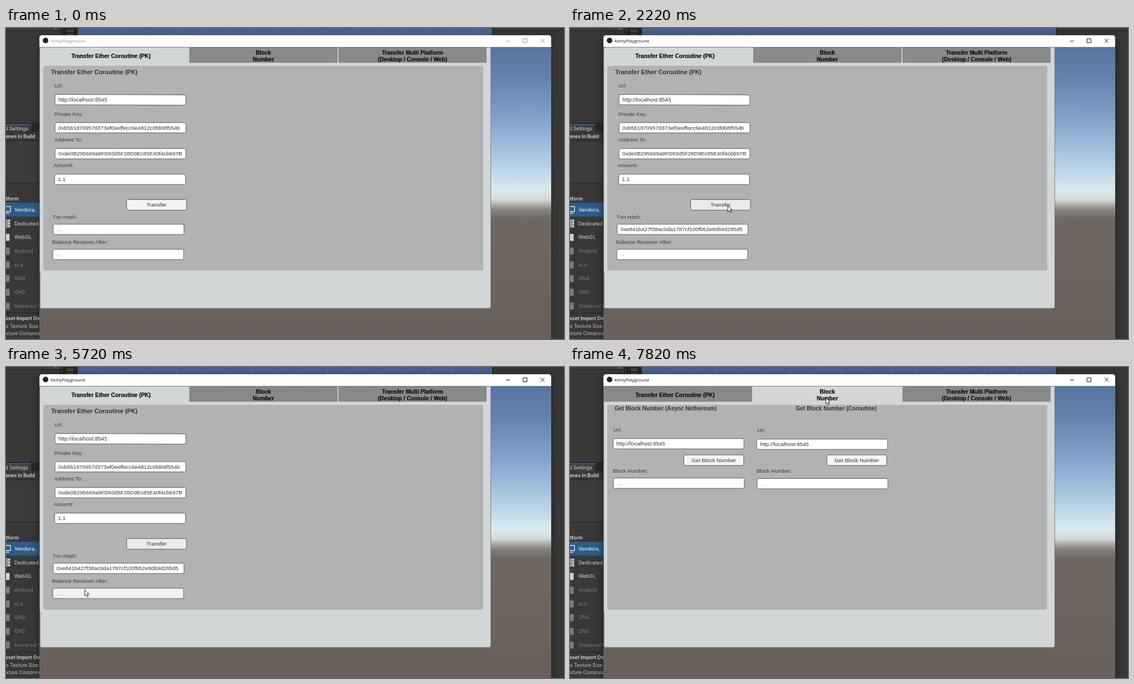
An HTML page for the animation above (8 s loop, 1002 by 559 pixels).

```html
<!DOCTYPE html>
<html lang="en">
<head>
<meta charset="utf-8">
<title>Transfer demo</title>
<style>
  html, body { margin: 0; width: 100%; height: 100%; overflow: hidden; background: #383838; }
  svg { display: block; width: 1002px; height: 559px; }
  text { white-space: pre; }
  .ui { font-family: "Liberation Sans", Arial, sans-serif; }
  .ed { font-family: Inter, Roboto, sans-serif; }
  .title { font-family: "Open Sans", "Noto Sans", sans-serif; }
</style>
</head>
<body>
<svg id="stage" viewBox="0 0 1002 559" xmlns="http://www.w3.org/2000/svg"></svg>
<script>
const LOOP = 8000, STEP = 69;
const CLICK = 2010, HASH = 2220, BALANCE = 6320, TAB_CLICK = 7750, SWITCH = 7820;

const rect = (x, y, w, h, fill, extra = '') =>
  `<rect x="${x}" y="${y}" width="${w}" height="${h}" fill="${fill}" ${extra}/>`;
const text = (x, y, size, str, fill, extra = '', cls = 'ui') =>
  `<text class="${cls}" x="${x}" y="${y}" font-size="${size}" fill="${fill}" ${extra}>${str}</text>`;
const line = (d, stroke, w = 1, extra = '') =>
  `<path d="${d}" fill="none" stroke="${stroke}" stroke-width="${w}" ${extra}/>`;
const bold = 'font-weight="700"', mid = 'text-anchor="middle"';

const label = (x, y, str) => text(x, y, 9.65, str, '#3c3c3c');
const box = (x, y, w, h, fill, id) =>
  rect(x, y, w, h, fill, `rx="2.5" stroke="#5c5c5c" ${id ? `id="${id}"` : ''}`);
const field = (x, y, str, id, color = '#323232') =>
  box(x, y, 235, 18.5, '#fff', id) +
  text(x + 6, y + 12.6, 9.8, str, color, id ? `id="${id}Text"` : '');
const button = (x, y, str, id) =>
  box(x, y, 107.5, 19, '#f5f5f5', id) + text(x + 53.7, y + 12.9, 9.8, str, '#323232', mid);
const tabText = (x, y, str) =>
  text(x + .8, y + .8, 10.1, str, '#000', `${bold} ${mid} opacity=".3"`) +
  text(x, y, 10.1, str, '#0c0c0c', `${bold} ${mid}`);

function defs() {
  const sky = [[34, '#58739f'], [90, '#6482af'], [150, '#7d9cc5'], [210, '#9dbcdb'], [260, '#bfd9ea'],
    [290, '#d8eaf0'], [309, '#d3dada'], [317, '#aeafad'], [328, '#858079'], [345, '#6f6761'], [559, '#6a605b']];
  const stops = sky.map(([y, c]) => `<stop offset="${(y - 34) / 525}" stop-color="${c}"/>`).join('');
  return `<defs><linearGradient id="sky" x1="0" y1="0" x2="0" y2="1">${stops}</linearGradient>
    <filter id="blur" x="-10%" y="-10%" width="120%" height="120%"><feGaussianBlur stdDeviation="9"/></filter></defs>`;
}

function editor() {
  let s = rect(0, 0, 1002, 559, '#383838');
  // strip behind the window
  s += rect(0, 0, 97, 4, '#3f3f3f') + rect(0, 4, 97, 1, '#252525') + line('M87 2.5l2-2 2 2', '#aaa');
  s += rect(97, 0, 5, 13, '#202020') + rect(99, 0, 2, 13, '#414141');
  s += rect(102, 0, 27, 14, '#262626') + line('M109 3.5h12M109 6.5h12M109 11.5h12', '#707070', 1);
  s += rect(129, 0, 744, 14, '#4a6295');
  for (let x = 173; x < 870; x += 45) s += line(`M${x} 0l-2 13`, '#8295b8', .7, 'opacity=".5"');
  s += rect(873, 0, 1.5, 14, '#1d1d1d') + rect(875, 4, 127, 1, '#2a2a2a');
  // build settings panel
  s += rect(0, 171, 62, 16, '#282828') + rect(0, 173, 45, 14, '#3d3d3d') + rect(0, 173, 45, 1.4, '#3a72b0');
  s += text(-2, 184.3, 8.8, 'd Settings', '#cfcfcf', '', 'ed');
  s += text(-1, 198.3, 8.6, 'enes In Build', '#dcdcdc', 'font-weight="600"', 'ed');
  s += rect(-2, 202.5, 70, 76, '#3c3c3c', 'stroke="#242424"');
  s += text(0, 310.3, 8.8, 'tform', '#d6d6d6', 'font-weight="600"', 'ed');
  s += rect(0, 314, 62, 25, '#2c5d87');
  const rows = ['Vendora,', 'Dedicated', 'WebGL', 'Android', 'eLa', 'QN4', 'QN5', 'Universal V'];
  rows.forEach((name, i) => {
    const y = 326.7 + i * 24.7, tone = i ? i < 3 ? '#d0d0d0' : '#7c7c7c' : '#fff';
    s += text(15, y + 3.2, 9.1, name, tone, '', 'ed');
    if (i === 0) s += line(`M-4 ${y - 6}h12v9h-12M0 ${y + 6}h6`, '#e4e4e4', 1.4);
    else if (i === 1) s += [-7, -2, 3].map(d => rect(-1, y + d, 8.5, 4, tone) +
      rect(1, y + d + 1.4, 3, 1.2, '#383838')).join('');
    else s += rect(-6, y - 6, 12.5, 12.5, tone);
  });
  s += text(-1, 524.5, 8.7, 'sset Import Ov', '#dcdcdc', 'font-weight="600"', 'ed');
  s += rect(0, 512, 62, 1, '#242424');
  s += text(0, 538.7, 8.7, 'x Texture Size', '#c4c4c4', '', 'ed');
  s += text(0, 552.2, 8.7, 'xture Compressi', '#c4c4c4', '', 'ed');
  return s;
}

function frame() {
  let s = rect(60, 16, 919, 560, '#000', 'id="shadow" filter="url(#blur)"');
  s += '<path d="M60 36V18q0-5 5-5h909q5 0 5 5v18z" fill="#fff"/>' + rect(60, 34, 919.5, 525, 'url(#sky)');
  s += rect(60, 34, 919, .7, '#8a8f96') + rect(979, 34, 1, 525, '#2c2c2c');
  s += '<circle cx="71" cy="22.5" r="5" fill="#222"/>';
  s += text(80, 25.8, 7.9, 'KelnyPlayground', '#000', 'id="caption"', 'title');
  s += `<path id="controls" d="M898 23.5h7M928.5 19.5h7v7h-7zM960 19.3l7 7m0-7l-7 7" fill="none" stroke-width="1"/>`;
  // canvas panel
  s += rect(60.5, 35, 810, 469, '#d2d6d7', 'rx="3" stroke="#6b7071" stroke-width=".8"');
  s += rect(60.5, 440, 1, 63, '#4c4f50');
  s += rect(863.5, 35, 6.5, 28, '#d2d6d7');
  s += '<path id="tab1"/><path id="tab2"/>' + tab(597, 863, '#878a89');
  s += rect(67, 68, 790, 368, '#b2b2b2', 'rx="4"');
  s += tabText(188.5, 53.6, 'Transfer Ether Coroutine (PK)');
  s += tabText(462, 47.6, 'Block') + tabText(462, 59.6, 'Number');
  s += tabText(730, 47.6, 'Transfer Multi Platform') + tabText(730, 59.6, '(Desktop / Console / Web)');
  return s;
}

const tabPath = (a, b) => `M${a} 62.5V37q0-2 2-2H${b - 2}q2 0 2 2V62.5z`;
const tab = (a, b, fill) => `<path d="${tabPath(a, b)}" fill="${fill}"/>`;

function transferPage() {
  const url = 'http://localhost:8545';
  return '<g id="transfer">' +
    text(81, 83, 11, 'Transfer Ether Coroutine (PK)', '#303030', bold) +
    label(87, 106.5, 'Url:') +
    `<g transform="rotate(.2 205 129)">${field(88, 119.9, url, 'url')}</g>` +
    label(86.7, 157.6, 'Private Key:') +
    field(88, 170.1, '0xb5b1870957d373ef0eeffecc6e4812c0fd08f554b', 'key') +
    label(86.7, 204.2, 'Address To:') +
    field(88, 216.7, '0xde0B295669a9FD93d5F28D9Ec85E40f4cb697B', 'addr') +
    label(85.8, 250.2, 'Amount:') + field(87.3, 262.7, '1.1', 'amount') +
    button(216.6, 308.4, 'Transfer', 'send') +
    label(84, 342.8, 'Txn Hash:') + field(84.7, 352.7, '...', 'hash') +
    label(82.7, 387.9, 'Balance Receiver After:') + field(84, 397.7, '...', 'balance') + '</g>';
}

function blockPage() {
  const column = (head, hx, x, y, bx) =>
    text(hx, 78.3, 10.1, head, '#303030', bold) +
    label(x + .7, y - 12.8, 'Url:') + field(x, y, 'http://localhost:8545') +
    button(bx, 158, 'Get Block Number') +
    label(x - .3, y + 60.8, 'Block Number:') + field(x + .7, y + 70.9, '...', '', '#8c8c8c');
  return '<g id="block">' +
    column('Get Block Number (Async Nethereum)', 80, 77.3, 128.7, 204.4) +
    column('Get Block Number (Coroutine)', 405.3, 335.2, 129.6, 461.3) + '</g>';
}

const $ = id => document.getElementById(id);
$('stage').innerHTML = defs() + editor() + frame() + transferPage() + blockPage() +
  '<circle id="spot" r="9.5" fill="#e6d820" opacity=".78"/>' +
  '<path id="pointer" d="M.3 .3V11.2L2.9 8.9L4.7 13L6.7 12.1L4.9 8.1H8.1Z" fill="#fff" stroke="#111" stroke-width=".9"/>';

// pointer strokes: [time, x, y]
const moves = [
  [[450, 34, 110], [600, 262, 196], [740, 540, 314], [860, 654, 364], [1000, 500, 358], [1130, 330, 336], [1210, 292, 328]],
  [[1270, 290, 327], [1480, 286, 322], [1810, 283, 319]],
  [[4020, 282, 319], [4090, 281, 319]],
  [[4490, 280, 319]],
  [[4750, 298, 325], [4890, 370, 352], [5030, 270, 384], [5160, 152, 397], [5230, 141, 398]],
  [[5720, 141, 400], [5860, 140, 401]],
  [[6720, 150, 388], [6930, 324, 186], [7130, 410, 105], [7480, 442, 66]],
  [[7540, 446, 62], [7750, 459, 55]]
];

function pointerAt(t) {
  const path = moves.filter(m => m[0][0] <= t).pop();
  if (!path) return null;
  const start = path[0][0], end = path[path.length - 1];
  if (t >= end[0]) return [end[1], end[2]];
  const q = start + Math.floor((t - start) / STEP) * STEP;
  const i = path.findIndex(p => p[0] > q);
  const a = path[i - 1], b = path[i], k = (q - a[0]) / (b[0] - a[0]);
  return [a[1] + (b[1] - a[1]) * k, a[2] + (b[2] - a[2]) * k];
}

const targets = ['url', 'key', 'addr', 'amount', 'hash', 'balance'].map($);
const num = (el, name) => +el.getAttribute(name);
function over(el, p) {
  const dx = p[0] - num(el, 'x'), dy = p[1] - num(el, 'y');
  return dx >= 0 && dy >= 0 && dx <= num(el, 'width') && dy <= num(el, 'height');
}
function set(id, attrs) {
  for (const k in attrs) $(id).setAttribute(k, attrs[k]);
}
function fill(id, str, ready) {
  $(id).textContent = ready ? str : '...';
  set(id, { fill: ready ? '#323232' : '#8c8c8c' });
}
const show = (id, on) => set(id, { visibility: on ? 'visible' : 'hidden' });

function draw(t) {
  const active = t >= CLICK, second = t >= SWITCH, p = pointerAt(t);
  const dim = '#878a89';
  set('caption', { fill: active ? '#111' : '#8799a3' });
  set('controls', { stroke: active ? '#111' : '#929292' });
  set('shadow', { opacity: active ? .42 : .25 });
  set('tab1', { d: second ? tabPath(61, 327) : tabPath(62, 328), fill: second ? dim : '#d2d6d7' });
  set('tab2', { d: second ? tabPath(327, 597) : tabPath(329, 595.5), fill: second ? '#d6d6d6' : dim });
  show('transfer', !second);
  show('block', second);

  const pressed = t >= CLICK + 70 && t < CLICK + 140;
  set('send', { fill: pressed ? '#c8c8c8' : active ? '#ebebeb' : '#f5f5f5' });
  for (const el of targets) el.setAttribute('fill', active && p && over(el, p) ? '#f2f2f2' : '#fff');
  fill('hashText', '0xe841b427f38ac0da1787cf100fb52e80b9d285d5', t >= HASH);
  fill('balanceText', '30.8', t >= BALANCE);

  show('pointer', !!p);
  show('spot', (t >= CLICK && t < CLICK + 140) || (t >= TAB_CLICK && t < SWITCH));
  if (p) {
    set('pointer', { transform: `translate(${p[0]} ${p[1]})` });
    set('spot', { cx: p[0], cy: p[1] + 2 });
  }
}

const origin = performance.now();
function tick() {
  draw((performance.now() - origin) % LOOP);
  requestAnimationFrame(tick);
}
tick();
</script>
</body>
</html>
```
